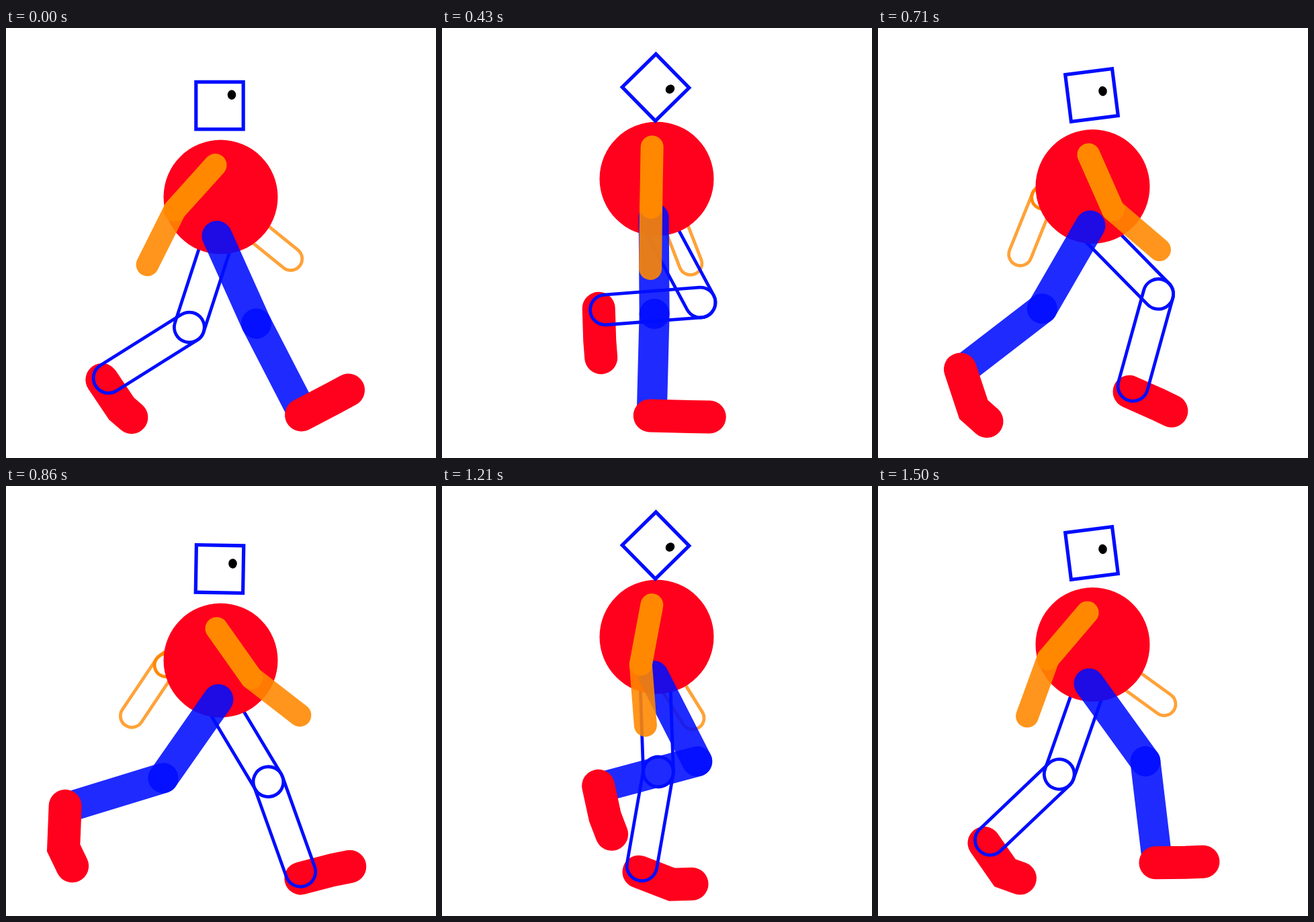
Recreate the animation shown at these times as an HTML page with a canvas. Size 640 by 640 pixels, loop 1570 ms.

```html
<!DOCTYPE html>
<html lang="en">
<head>
<meta charset="utf-8">
<title>Walk cycle</title>
<style>
  html, body { margin: 0; width: 100%; height: 100%; overflow: hidden; background: #fff; }
  canvas { display: block; }
</style>
</head>
<body>
<canvas id="stage" width="640" height="640"></canvas>
<script>
const ctx = document.getElementById('stage').getContext('2d');
const RED = '#ff001d', BLUE = '#000dff', ORANGE = '#ff8800';
const LOOP = 1570, STEPS = 22, FPS = 14;

// Each key starts with its step. Angles are degrees from straight down, positive forward.
// Body repeats every half cycle: torso y, head turn beyond its steady spin, eye x, eye y
const body = [
  [0, 251.5, 0, 336, 99.5], [1, 259.5, -15.4, 337.5, 115.5], [4, 264, -51.7, 338, 139.5],
  [6, 224.5, -52.7, 339.5, 91], [7, 212, -39.5, 337, 67], [8, 203, -21, 340, 66],
  [9, 209.5, -3.5, 344, 75.5], [10, 236, 9.2, 334.5, 94]
];
// Legs: thigh, shin, ball of foot x, y and toe x, y (from the heel)
const nearLeg = [
  [0, 24.2, 27.3, 44, -23, 70, -37], [2, 32.5, 14, 48, -6, 76, -9], [4, 36, -1, 52, 0, 80, 0],
  [6, 0.4, -1.5, 60, 1.5, 89, 2], [9, -24.4, -40, 32, 53, 55, 65.5],
  [12, -35, -73, -2.5, 62.5, 10.5, 89.5], [15, -16.3, -79, -6, 57, 2, 85],
  [17, 27, -75, 10, 46, 20, 72], [18, 48.4, -51.5, 22, 36, 38, 59], [21, 35.9, 6.8, 45, -0.5, 71, -1.5]
];
const farLeg = [
  [0, -18, -57.9, 29, 43, 44, 56], [2, -25, -75, 0, 60, 10, 85], [4, -9, -84, -5, 54, 3, 80],
  [6, 28.2, -85.6, 1.5, 48, 3.5, 73.5], [9, 48.4, -36.5, 36, 34, 53.5, 51.5],
  [12, 30.9, 19.7, 48, -12.5, 73, -17.5], [15, 36.4, -0.8, 50, 0, 77.5, 0],
  [18, -13.4, -15.9, 47, 28, 77, 27.5], [21, -19.3, -46.4, 31, 44.5, 53.5, 52.5]
];
// Arms: upper arm, forearm
const nearArm = [
  [0, -42, -26.6], [3, -24, -18], [6, -1, -0.6], [9, 16.2, 42.3],
  [12, 35.3, 52.2], [15, 15.2, 25.7], [18, -22.3, -4.7], [21, -40.4, -20]
];
const farArm = [
  [0, 26.5, 51], [3, 31, 45], [6, 15.7, 21.2], [9, -36, -12],
  [12, -53.5, -33.9], [15, -24.5, -6.7], [18, 20.8, 47.4], [21, 26, 54]
];

// Smooth periodic interpolation of all values in a key list
function sample(keys, time, period) {
  const n = keys.length, t = time % period;
  let k = n - 1;
  while (keys[k][0] > t) k--;
  const at = j => keys[(j + n) % n];
  const when = j => at(j)[0] + period * Math.floor(j / n);
  const span = when(k + 1) - when(k), u = (t - when(k)) / span;
  return at(k).slice(1).map((a, c) => {
    const value = j => at(j)[c + 1];
    const slope = j => (value(j + 1) - value(j - 1)) / (when(j + 1) - when(j - 1)) * span;
    const b = value(k + 1), m0 = slope(k), m1 = slope(k + 1);
    return a + u * (m0 + u * (3 * (b - a) - 2 * m0 - m1 + u * (2 * (a - b) + m0 + m1)));
  });
}

function reach([x, y], length, degrees) {
  const a = degrees * Math.PI / 180;
  return [x + length * Math.sin(a), y + length * Math.cos(a)];
}

function line(points, color, width, alpha = 1) {
  ctx.globalAlpha = alpha;
  ctx.strokeStyle = color;
  ctx.lineWidth = width;
  ctx.lineCap = 'round';
  ctx.beginPath();
  points.forEach(p => ctx.lineTo(...p));
  ctx.stroke();
  ctx.globalAlpha = 1;
}

function outline(p, q, r, color, width, alpha = 1) {
  const a = Math.atan2(q[1] - p[1], q[0] - p[0]), right = Math.PI / 2;
  ctx.globalAlpha = alpha;
  ctx.strokeStyle = color;
  ctx.lineWidth = width;
  ctx.beginPath();
  ctx.arc(...p, r, a + right, a - right);
  ctx.arc(...q, r, a - right, a + right);
  ctx.closePath();
  ctx.stroke();
  ctx.globalAlpha = 1;
}

function legPose(keys, step, hip) {
  const [thigh, shin, ballX, ballY, toeX, toeY] = sample(keys, step, STEPS);
  const knee = reach(hip, 143, thigh), ankle = reach(knee, 142, shin);
  const heel = reach(ankle, 10, shin - 17);
  const foot = [heel, [heel[0] + ballX, heel[1] + ballY], [heel[0] + toeX, heel[1] + toeY]];
  return { hip, knee, ankle, foot };
}

function armPose(keys, step, shoulder, upperLength) {
  const [upper, lower] = sample(keys, step, STEPS);
  const elbow = reach(shoulder, upperLength, upper);
  return { shoulder, elbow, hand: reach(elbow, 91, lower) };
}

function draw(step) {
  const half = STEPS / 2;
  const [y, turn, eyeX, eyeY] = sample(body, step, half);
  const spin = (turn + 180 * step / half) * Math.PI / 180;
  const sway = -Math.cos(2 * Math.PI * step / STEPS);
  ctx.clearRect(0, 0, 640, 640);

  const backArm = armPose(farArm, step, [312, y - 47.5], 92);
  outline(backArm.shoulder, backArm.elbow, 17, ORANGE, 4.8);
  outline(backArm.elbow, backArm.hand, 17, ORANGE, 4.8, 0.78);

  const backLeg = legPose(farLeg, step, [317, y + 58]);
  line(backLeg.foot, RED, 49);
  outline(backLeg.hip, backLeg.knee, 22.4, BLUE, 4.8);
  outline(backLeg.knee, backLeg.ankle, 22.4, BLUE, 4.8);

  ctx.fillStyle = RED;
  ctx.beginPath();
  ctx.arc(319.5, y, 85, 0, 7);
  ctx.fill();

  const leg = legPose(nearLeg, step, [315 + sway, y + 58]);
  line([leg.hip, leg.knee], BLUE, 45, 0.88);
  line([leg.knee, leg.ankle], BLUE, 45, 0.88);
  line(leg.foot, RED, 49);

  const arm = armPose(nearArm, step, [312.5 + sway, y - 47.5], 90);
  line([arm.elbow, arm.hand], ORANGE, 34, 0.89);
  line([arm.shoulder, arm.elbow], ORANGE, 34);

  ctx.save();
  ctx.translate(318, y - 136);
  ctx.rotate(spin);
  ctx.strokeStyle = BLUE;
  ctx.lineWidth = 5.2;
  ctx.strokeRect(-35.2, -35.2, 70.4, 70.4);
  ctx.restore();

  ctx.fillStyle = '#000';
  ctx.beginPath();
  ctx.ellipse(eyeX, eyeY, 6.3, 7.2, spin, 0, 7);
  ctx.fill();
}

function tick() {
  const time = performance.now() % LOOP;
  draw(Math.min(STEPS - 1, Math.floor((time + 5) * FPS / 1000)));
  requestAnimationFrame(tick);
}
tick();
</script>
</body>
</html>
```
